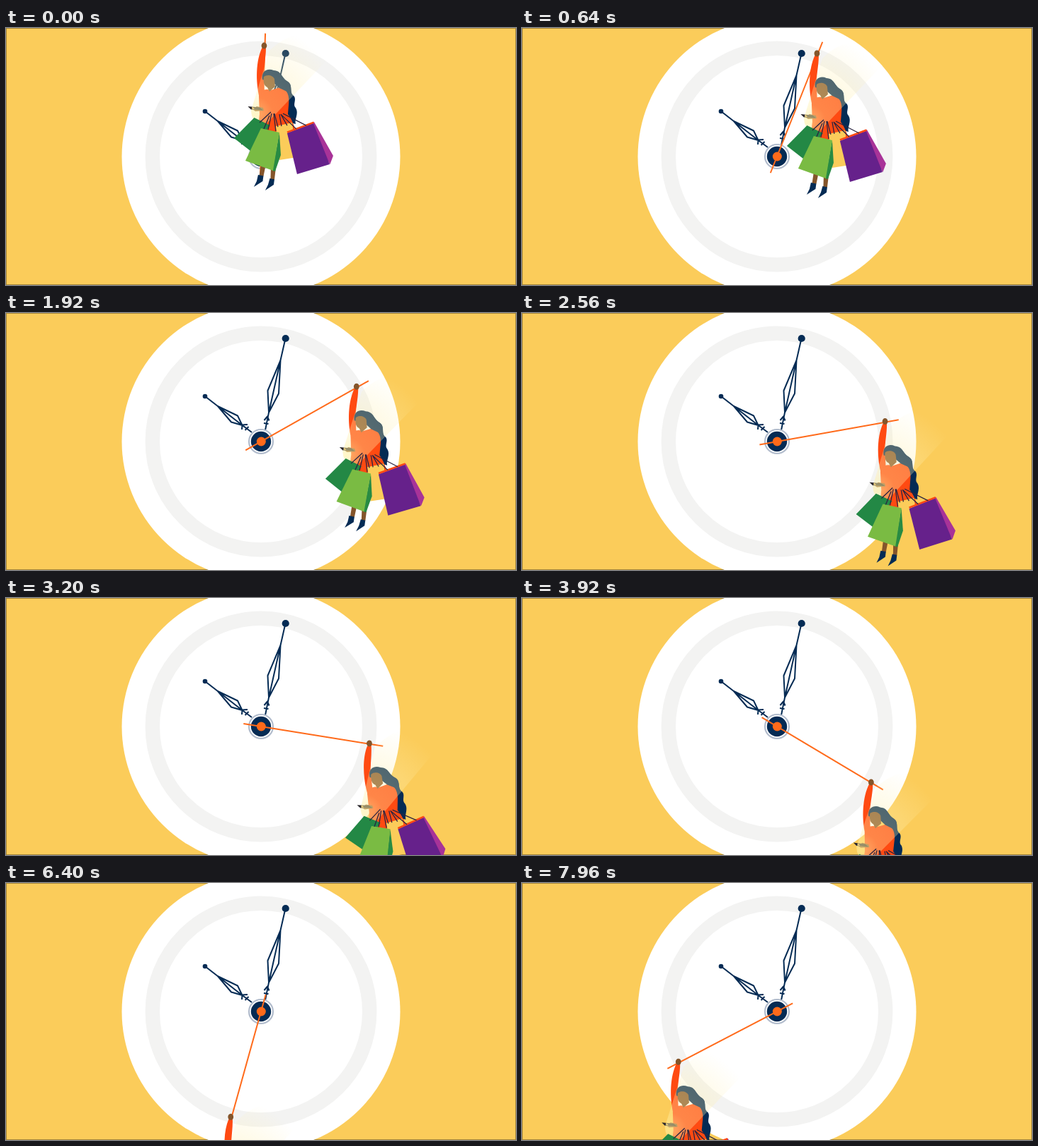
An HTML page that plays this animation: 720 by 364 pixels, repeating every 8 s.

```html
<!DOCTYPE html>
<html lang="en">
<head>
<meta charset="utf-8">
<title>Shopping against the clock</title>
<style>
  html, body { margin: 0; width: 100%; height: 100%; overflow: hidden; background: #fbcc5a; }
  svg { display: block; width: 100%; height: 100%; }
  .line { fill: none; stroke: #042b54; stroke-width: 2; stroke-linejoin: round; }
  .navy { fill: #042b54; }
  .skin { fill: #84552b; }
  .orange { fill: #ff4a12; }
  .handle { fill: none; stroke: #2a2440; stroke-width: 1.3; }
</style>
</head>
<body>
<svg viewBox="0 0 720 364">
  <defs>
    <radialGradient id="glow" gradientUnits="userSpaceOnUse" cx="352" cy="122" r="125">
      <stop offset="0" stop-color="#fff0a0" stop-opacity=".6"/>
      <stop offset=".2" stop-color="#fff0a8" stop-opacity=".36"/>
      <stop offset=".55" stop-color="#fff0b0" stop-opacity=".3"/>
      <stop offset="1" stop-color="#fff0b0" stop-opacity="0"/>
    </radialGradient>
  </defs>

  <!-- Dial -->
  <rect width="720" height="364" fill="#fbcc5a"/>
  <rect x=".5" y=".5" width="719" height="363" fill="none" stroke="#5d4d25" stroke-opacity=".55"/>
  <circle cx="360" cy="182" r="196.5" fill="#fff"/>
  <circle cx="360" cy="182" r="153.2" fill="none" stroke="#f3f3f2" stroke-width="20.5"/>

  <!-- Hour and minute hands -->
  <g class="line">
    <path d="M281 118L299 132L327 145.5L333.5 159L318 154.500L299 132L333.5 159L347 169M333 165L333.5 158.500L341 158M337.500 166L342.500 161"/>
    <path d="M394.500 36L387.500 67L369.500 110L371 141L385 114L387.500 67L371 141L366 166M364.500 152L369 146.500L371.500 152.500M364 156L370.500 157"/>
  </g>
  <circle class="navy" cx="281" cy="118" r="3.300"/>
  <circle class="navy" cx="394.700" cy="36" r="5.100"/>

  <!-- Hub and second hand -->
  <circle cx="360" cy="182" r="17" fill="#fff" stroke="#b3bdcd" stroke-width="2.200"/>
  <circle class="navy" cx="360" cy="182" r="14.200"/>
  <path id="second" d="M360 207V7.500" stroke="#ff6a1a" stroke-width="2"/>
  <circle cx="360.300" cy="182" r="6.500" fill="#ff6a1a"/>

  <g id="shopper">
    <!-- Legs and boots -->
    <path class="skin" d="M360 193H367L363.500 210H357.500ZM374 198H381L379 215H373.500Z"/>
    <path class="navy" d="M356 208L363.500 209.500L362.500 217L350 225L354 217ZM372.500 213L379 214.500L378 222L366 230L370 222Z"/>

    <!-- Hair, dress, face and raised arm -->
    <path class="navy" d="M380 62C391 64 389 71 398 76C405 80 400 89 405 95C412 100 404 108 409 113C414 121 407 129 409 136L398 133L392 100Z"/>
    <path class="orange" d="M357 96C360 88 366 85 374 88L387 84C397 87 401 95 399 110L398 122C404 130 408 140 409 149H361C356 139 357 129 358 122Z"/>
    <path class="orange" d="M361.500 28H367C367 44 363 57 364 72L365 94L358 99C352 75 353 46 361.500 28Z"/>
    <path class="navy" d="M362 73C360 61 369 56 378 60C390 61 388 70 398 76C404 80 402 88 403 93L386 85L378 78Z"/>
    <path class="skin" d="M364 69C369 65 377 67 379 72L380 83L372 90L369 84C364 82 363 76 364 69Z"/>
    <ellipse class="skin" cx="364.500" cy="25" rx="3.900" ry="4.500"/>

    <!-- Phone and its light -->
    <path class="skin" d="M348 115L354 111L363 113L364 117L352 118Z"/>
    <path d="M341.500 111L358 112.500L363 116.500L346 115.500Z" fill="#29262c"/>
    <path d="M347 112L349 112.500L351 115H348.500Z" fill="#e6b552"/>
    <path d="M346 117L372 32Q402 2 440 10L464 34L357 147L347 124Z" fill="url(#glow)"/>

    <!-- Bags -->
    <path d="M381 139L404 134L411 183L386 187Z" fill="#fbcc5a"/>
    <path d="M350.500 127L373 138L345 174L322 156Z" fill="#238845"/>
    <path d="M386 148L388 180L380 203L376 202Z" fill="#288b43"/>
    <path d="M360 142L386 148L377 202L338 188Z" fill="#7abb43"/>
    <path d="M397 149L435 133L462 181L457.500 193L432 150Z" fill="#a83398"/>
    <path d="M397 149L434 135L457 193L411 207Z" fill="#66218b"/>
    <path d="M397 147.500L434.500 133.500" stroke="#ff4a12" stroke-width="2.500"/>
    <path class="handle" d="M374 119L358 134M372 124L364 143M375 121L370 144M378 121L381 146M379 121L384 140M386 122L389 139M388 122L397 138M388 122L410 143M391 121L424 138"/>
  </g>
</svg>
<script>
  const LOOP = 8000, STEP = 40;
  const CENTER = { x: 360, y: 182 }, GRIP_RADIUS = 156;
  const GRIP = { x: 365.5, y: 26 };
  const second = document.getElementById('second');
  const shopper = document.getElementById('shopper');

  function render(now) {
    const t = Math.floor((now % LOOP) / STEP) * STEP / 1000;
    const angle = 3.3 + 30.04 * t - 1.3 * Math.exp(-t / 1.9);
    const rad = angle * Math.PI / 180;
    const x = CENTER.x + GRIP_RADIUS * Math.sin(rad);
    const y = CENTER.y - GRIP_RADIUS * Math.cos(rad);
    // She hangs from the hand and sways gently about her grip.
    const sway = -1.24 - 2.7 * Math.cos(2 * Math.PI * (t - 1.24) / 1.84);

    second.setAttribute('transform', `rotate(${angle} ${CENTER.x} ${CENTER.y})`);
    shopper.setAttribute('transform',
      `translate(${x} ${y}) rotate(${sway}) translate(${-GRIP.x} ${-GRIP.y})`);
  }

  const start = performance.now();
  function tick() {
    render(performance.now() - start);
    requestAnimationFrame(tick);
  }
  tick();
</script>
</body>
</html>
```
